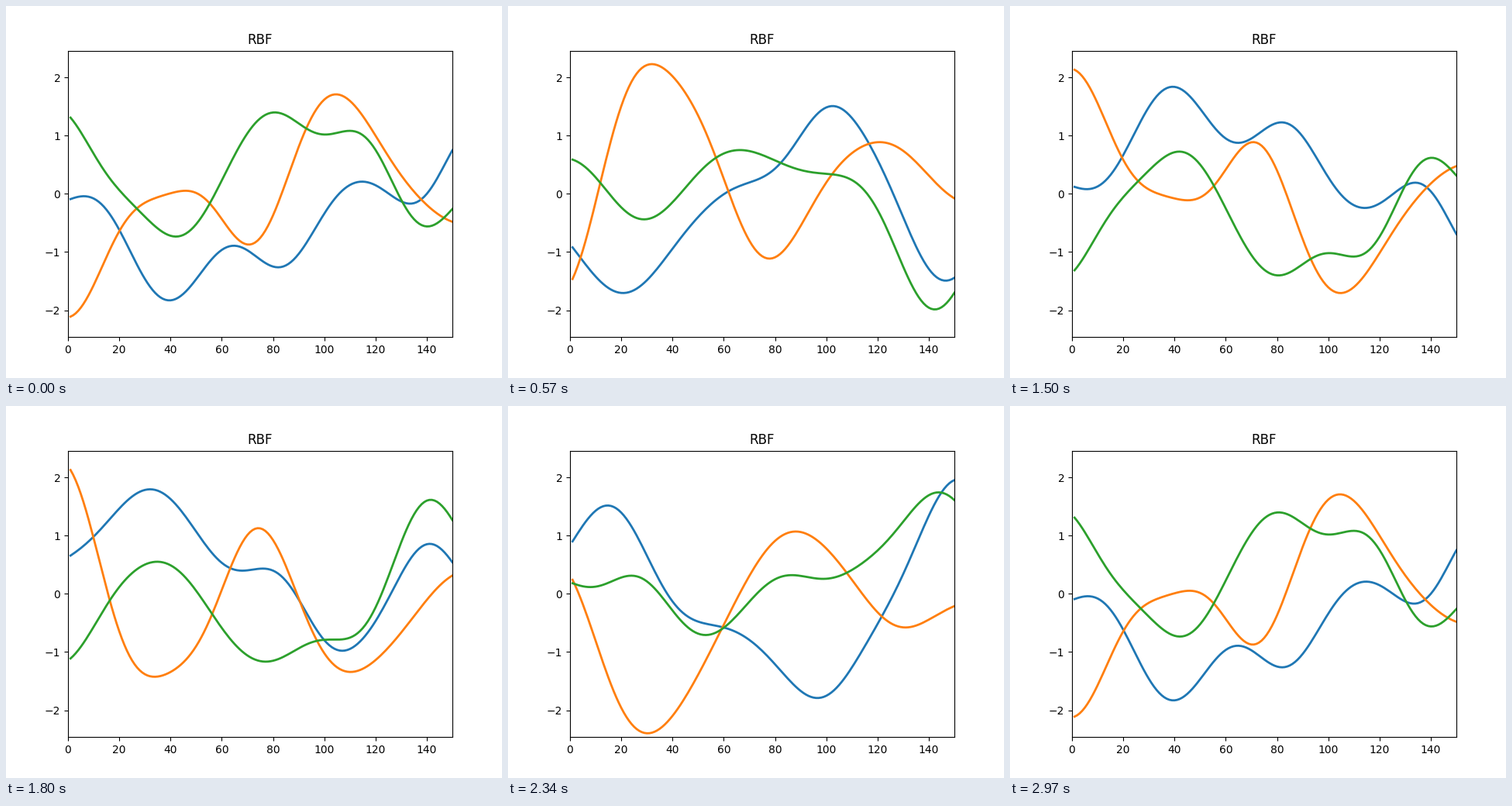
Animation of 640 by 480 pixels, one loop 3 s. Source, as a matplotlib script:

```python
import matplotlib.pyplot as plt
import numpy as np
from matplotlib.animation import FuncAnimation

FRAMES = 100
LENGTH_SCALE = 15.0
Y_MAX = 2.4615

x = np.linspace(1, 150, 150)
# Key positions: evenly spaced, a little closer towards both ends.
keys = np.array([1, 10, *range(25, 131, 15), 140, 150], dtype=float)

# For each curve, its key heights at the start and a quarter turn later.
CURVES = [
    ([-.09, -.08, -1.05, -1.83, -1.18, -.97, -1.23, -.34, .21, -.13, 0, .75],
     [-.95, -1.49, -1.37, -.31, .26, .58, 1.2, 1.72, .98, -.38, -1.38, -1.83]),
    ([-2.11, -1.57, -.33, .01, -.15, -.87, .2, 1.62, 1.34, .32, -.19, -.48],
     [-.76, .45, 2.27, 2.16, .96, -.53, -1.03, -.41, .38, .67, .41, .1]),
    ([1.31, .69, -.17, -.72, -.19, 1.04, 1.35, 1.02, 1.01, -.1, -.56, -.26],
     [.13, .04, -.36, .12, .67, .39, 0, -.02, -.33, -1.3, -1.88, -1.72]),
]


def rbf(a, b):
    return np.exp(-0.5 * ((a[:, None] - b) / LENGTH_SCALE) ** 2)


def through_keys(heights):
    """Mean of an RBF Gaussian process that passes through the keys."""
    return rbf(x, keys) @ np.linalg.solve(rbf(keys, keys), np.array(heights))


draws = [(through_keys(a), through_keys(b)) for a, b in CURVES]

fig, ax = plt.subplots(figsize=(6.4, 4.8), dpi=100)
ax.set_title("RBF")
ax.set_xlim(0, 150)
ax.set_ylim(-Y_MAX, Y_MAX)
lines = [ax.plot([], [], lw=2)[0] for _ in draws]


def update(i):
    # One full turn on the circle spanned by the two draws.
    angle = 2 * np.pi * i / (FRAMES - 1)
    for line, (a, b) in zip(lines, draws):
        line.set_data(x, a * np.cos(angle) + b * np.sin(angle))
    return lines


anim = FuncAnimation(fig, update, frames=FRAMES, interval=30,
                     repeat=True, repeat_delay=0)
plt.show()
```
